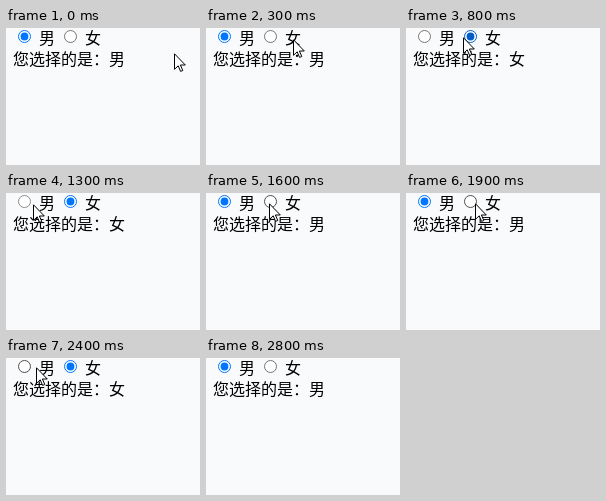
These frames come from a looping animation (194 by 137 pixels, 3400 ms). An HTML page:

```html
<!DOCTYPE html>
<html lang="zh-CN">
<head>
<meta charset="utf-8">
<title>单选按钮</title>
<style>
  html, body { margin: 0; width: 100%; height: 100%; overflow: hidden; background: #f8fafc; }
  svg { display: block; width: 194px; height: 137px; }
  text { font: 350 16px "Noto Sans CJK SC", "Noto Sans CJK", "Noto Sans", sans-serif; fill: #000; }
</style>
</head>
<body>
<svg viewBox="0 0 194 137">
  <g id="male" transform="translate(18.5 8.5)">
    <circle r="6" fill="#fff"/><circle r="3.9"/>
  </g>
  <text x="33" y="16">男</text>
  <g id="female" transform="translate(64.5 8.5)">
    <circle r="6" fill="#fff"/><circle r="3.9"/>
  </g>
  <text x="79" y="16">女</text>
  <text x="7" y="37">您选择的是：<tspan id="choice">男</tspan></text>
  <path id="cursor" fill="#fff" stroke="#000"
    d="M.5 .8V16.3L4.2 12.8L6.6 18.4L8.8 17.5L6.4 12H11.3Z"/>
</svg>
<script>
const LOOP = 3400, STEP = 100, CLICK = 700, HIDE = 4 * CLICK, REACH = 12;
const $ = id => document.getElementById(id);

// hold: how long the button stays pressed before a click
const radios = [
  { id: "male", label: "男", x: 18.5, hold: 200 },
  { id: "female", label: "女", x: 64.5, hold: 0 }
];
const colors = {
  off: { rest: "#767676", hover: "#4f4f4f", press: "#8d8d8d" },
  on: { rest: "#0075ff", hover: "#005cc8", press: "#3793ff" }
};

// Pointer trips between the two radios
const origin = { x: 168, y: 25 };
const trips = [
  { from: 0, to: 420, x: 67, y: 8 },
  { from: 700, to: 1000, x: 27, y: 11 },
  { from: 1400, to: 1700, x: 75, y: 10 },
  { from: 1800, to: 1900, x: 69, y: 10 },
  { from: 2100, to: 2400, x: 30, y: 9 }
];

const mix = (a, b, p) => Math.round(a + (b - a) * p);

function ease(p) {
  p = Math.min(Math.max(p, 0), 1);
  return p * p * (3 - 2 * p);
}

function pointerAt(t) {
  return trips.reduce((pos, trip) => {
    const p = ease((t - trip.from) / (trip.to - trip.from));
    return { x: mix(pos.x, trip.x, p), y: mix(pos.y, trip.y, p) };
  }, origin);
}

function paintRadio(radio, checked, pointerX, t) {
  const over = t < HIDE && Math.abs(pointerX - radio.x) < REACH;
  const pressed = t % CLICK >= CLICK - radio.hold;
  const state = !over ? "rest" : pressed ? "press" : "hover";
  const color = colors[checked ? "on" : "off"][state];
  const [ring, dot] = $(radio.id).children;
  ring.setAttribute("stroke", color);
  dot.setAttribute("fill", checked ? color : "none");
}

function paint(t) {
  const { x, y } = pointerAt(t);
  const chosen = radios[Math.floor(t / CLICK) % 2];
  radios.forEach(radio => paintRadio(radio, radio === chosen, x, t));
  $("choice").textContent = chosen.label;
  $("cursor").setAttribute("transform", `translate(${x} ${y})`);
  $("cursor").setAttribute("visibility", t < HIDE ? "visible" : "hidden");
}

const start = performance.now();
function tick() {
  const t = (performance.now() - start) % LOOP;
  paint(Math.floor(t / STEP) * STEP);
  requestAnimationFrame(tick);
}
tick();
</script>
</body>
</html>
```
